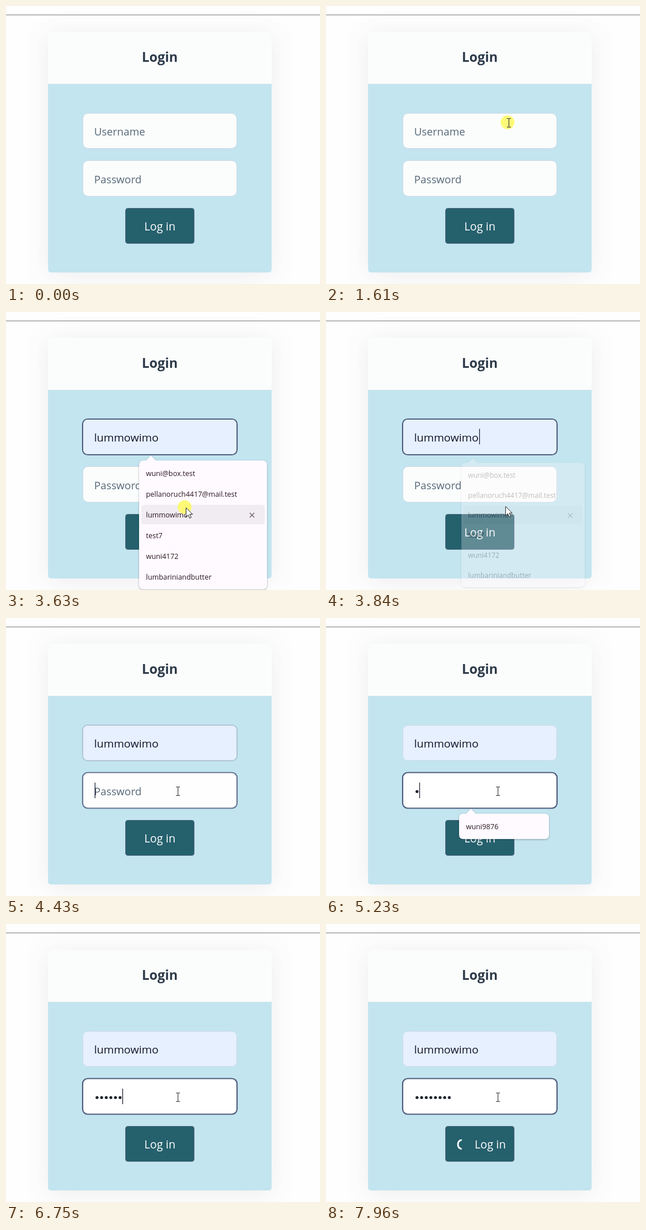
These frames come from a looping animation (545 px wide and 483 px high, 8000 ms). An HTML page:

```html
<!DOCTYPE html>
<html lang="en">
<head>
<meta charset="utf-8">
<title>Login</title>
<style>
  html, body { margin: 0; height: 100%; overflow: hidden; background: #fefefe; }
  svg { display: block; font-family: "Open Sans", "Noto Sans", sans-serif; }
  #stage { width: 100%; height: 100%; }
  .hint { font-size: 18.3px; fill: #566878; }
  .typed { font-size: 19px; fill: #14162a; }
  .field { fill: #fbfdfc; stroke: #cbd7e6; }
  .focus { fill: #fff; stroke: #505f80; stroke-width: 2.2; }
  .menu { font-size: 12.4px; font-weight: 500; fill: #2b1720; }
  .panel { fill: #fffaff; filter: drop-shadow(0 1px 1.5px rgba(40, 50, 60, .4)); }
  .card { fill: #c3e5ef; filter: drop-shadow(0 4px 22px rgba(50, 60, 90, .09)); }
</style>
</head>
<body>
<svg id="stage" viewBox="0 0 545 483">
  <path d="M0 15.5H545" stroke="#7d7d7d"/>
  <rect class="card" x="73" y="45" width="388" height="418" rx="5"/>
  <path d="M73 135V50q0-5 5-5H456q5 0 5 5V135Z" fill="#fbfdfc"/>
  <path d="M73 135.5H461" stroke="#d9e8ec"/>
  <text x="267" y="97" text-anchor="middle" font-size="23" font-weight="700" fill="#2d3a4a">Login</text>

  <rect class="field" x="133.5" y="186.5" width="267" height="61" rx="9"/>
  <rect class="focus" id="userFocus" x="133" y="186" width="268" height="62" rx="9"/>
  <rect id="autofill" x="134" y="187" width="266" height="60" rx="8" fill="#e6f0fe"/>
  <text class="hint" id="userHint" x="153" y="225">Username</text>
  <svg x="134" y="187" width="247" height="60"><text class="typed" id="userText" x="19" y="38"></text></svg>

  <rect class="field" x="133.5" y="268.5" width="267" height="62" rx="9"/>
  <rect class="focus" id="passFocus" x="133" y="268.5" width="268" height="62" rx="9"/>
  <text class="hint" id="passHint" x="153" y="308">Password</text>
  <g id="dots" fill="#20242e"></g>
  <path id="caret" stroke="#14162a" stroke-width="1.2"/>

  <rect x="207.5" y="351.5" width="119" height="61" rx="4" fill="#25606d" stroke="#48607a"/>
  <path id="spinner" fill="none" stroke="#fff" stroke-width="2.8" stroke-linecap="round"/>
  <text id="buttonText" y="390" text-anchor="middle" font-size="19.3" fill="#fff">Log in</text>

  <g class="menu" id="userMenu">
    <path class="panel" d="M239 258H243L251.500 249.500L260 258H445q8 0 8 8V474q0 8-8 8H239q-8 0-8-8V266q0-8 8-8Z"/>
    <g id="hover">
      <rect x="235" y="-18" width="214" height="34" rx="5" fill="#f1ecf2"/>
      <path d="M423-4l8 8m0-8l-8 8" stroke="#6a6068" stroke-width="1.3"/>
    </g>
    <g id="options"></g>
  </g>
  <g class="menu" id="passMenu">
    <path class="panel" d="M238 340H243L251.500 331.500L260 340H380q7 0 7 7V377q0 7-7 7H238q-7 0-7-7V347q0-7 7-7Z"/>
    <text x="243" y="367">wuni9876</text>
  </g>

  <circle id="click" r="12" fill="#fdf964" fill-opacity=".88"/>
  <path id="ibeam" d="M-3.500-7.500H-1L0-7L1-7.500H3.500M0-7V7M-3.500 7.500H-1L0 7L1 7.500H3.500" fill="none" stroke="#34343c" stroke-width="1.1"/>
  <path id="arrow" d="M.5 0V16L4.200 12.500L6.800 18.200L9.400 17L6.900 11.500H11.800Z" fill="#fff" stroke="#222" stroke-linejoin="round"/>
</svg>
<script>
const LOOP = 8000;
const accounts = ["wuni@box.test", "pellanoruch4417@mail.test", "lummowimo", "test7", "wuni4172", "lumbariniandbutter"];
const chosen = 2;
const keyTimes = [5130, 5430, 5630, 5750, 6550, 6650, 6950, 7050];
const caretResets = [1730, 3730, 4330, ...keyTimes];
const clicks = [1560, 3630, 4230];
// time, x, y
const pointerPath = [
  [710, 424, 455], [810, 397, 427], [910, 377, 411], [1010, 377, 411],
  [1510, 317, 203], [1610, 317, 203], [1810, 317, 206], [2130, 317, 206],
  [2530, 298, 261], [2630, 298, 261], [3030, 308, 346], [3130, 308, 346],
  [3330, 312, 340], [3830, 312, 340], [4030, 298, 301]
];

const $ = id => document.getElementById(id);
const set = (id, name, value) => $(id).setAttribute(name, value);
const show = (id, on) => set(id, "opacity", +on);
const ramp = (t, from, to) => Math.min(1, Math.max(0, (t - from) / (to - from)));
const place = (id, x, y) => set(id, "transform", `translate(${x} ${y})`);

$("options").innerHTML = accounts.map((name, i) => `<text x="243" y="${285 + 36 * i}">${name}</text>`).join("");
$("dots").innerHTML = keyTimes.map((_, i) => `<circle cx="${158 + 8 * i}" cy="301.500" r="2.600"/>`).join("");

const arcPoint = degrees => {
  const a = degrees * Math.PI / 180;
  return `${237 + 8 * Math.cos(a)} ${383 + 8 * Math.sin(a)}`;
};
set("spinner", "d", `M${arcPoint(108)}A8 8 0 0 1 ${arcPoint(252)}`);

function pointerAt(t) {
  const next = pointerPath.findIndex(p => p[0] > t);
  if (next < 1) return pointerPath.at(next).slice(1);
  const [a, b] = [pointerPath[next - 1], pointerPath[next]];
  const k = ramp(t, a[0], b[0]);
  return [a[1] + (b[1] - a[1]) * k, a[2] + (b[2] - a[2]) * k];
}

function drawMenu(id, amount, cx, cy) {
  const s = .95 + .05 * amount;
  show(id, amount > 0);
  set(id, "opacity", amount);
  set(id, "transform", `translate(${cx} ${cy}) scale(${s}) translate(${-cx} ${-cy})`);
}

function draw(t) {
  const [x, y] = pointerAt(t);
  const menuOpen = t >= 1810 && t < 3890;
  const row = t >= 3330 ? chosen : menuOpen ? Math.floor((y - 262) / 36) : -1;
  const filled = row >= 0;
  const typed = keyTimes.filter(k => k <= t).length;

  set("userFocus", "opacity", ramp(t, 1690, 1840) - ramp(t, 4310, 4460));
  set("passFocus", "opacity", ramp(t, 4310, 4460));
  show("autofill", filled);
  show("userHint", !filled);
  $("userText").textContent = filled ? accounts[row] : "";
  show("passHint", !typed);
  [...$("dots").children].forEach((dot, i) => dot.setAttribute("opacity", +(i < typed)));

  const reset = caretResets.filter(r => r <= t).pop();
  const inPassword = t >= 4330;
  const caretX = inPassword ? 154.5 + 8 * typed : t >= 3730 ? 266.5 : 154.5;
  set("caret", "d", `M${caretX} ${inPassword ? 286 : 203}v27`);
  show("caret", reset !== undefined && Math.floor((t - reset) / 500) % 2 === 0);

  drawMenu("userMenu", ramp(t, 1740, 1890) - ramp(t, 3710, 3890), 342, 370);
  drawMenu("passMenu", ramp(t, 5100, 5220) - ramp(t, 6600, 6740), 309, 362);
  show("hover", filled);
  place("hover", 0, 281 + 36 * row);

  const loading = t >= 7660;
  show("spinner", loading);
  set("spinner", "transform", `rotate(${(t - 7960) * .48} 237 383)`);
  set("buttonText", "x", loading ? 285 : 267);

  const overField = x > 133 && x < 401 && (y > 186 && y < 248 || y > 268 && y < 331 && !menuOpen);
  const visible = t >= 710;
  show("ibeam", visible && overField);
  show("arrow", visible && !overField);
  place("ibeam", x + .5, y);
  place("arrow", x, y);
  show("click", clicks.some(c => t >= c && t < c + (c < 2000 ? 150 : 100)));
  place("click", x - 2, y - 1);
}

function tick() {
  draw(performance.now() % LOOP);
  requestAnimationFrame(tick);
}
tick();
</script>
</body>
</html>
```
